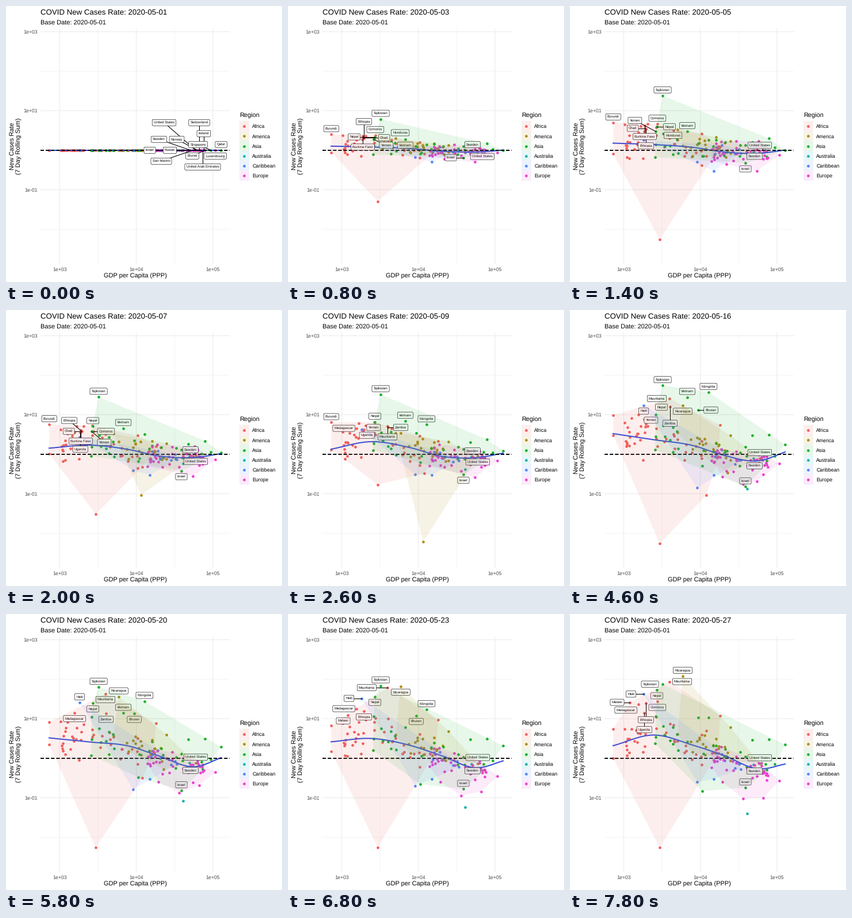
A matplotlib script for the animation above (8000 ms loop, 480 by 480 pixels).

```python
import numpy as np
import matplotlib.pyplot as plt
from matplotlib.animation import FuncAnimation
from matplotlib.patches import Polygon, Rectangle

plt.rcParams["font.family"] = "Liberation Sans"
plt.rcParams["text.hinting"] = "none"

SIZE, FRAMES, STEP = 480, 40, 200
LEFT, RIGHT, TOP, BOTTOM = 60, 389, 39, 448
ONE = 250.8                   # height of the rate 1
DECADE_X, DECADE_Y = 133.2, 68.7
COLORS = {"Africa": "#F35E5A", "America": "#AF8E13", "Asia": "#17B12B",
          "Australia": "#18B0B4", "Caribbean": "#5086FF", "Europe": "#EE3FD3"}

# Trend heights at a few knots, one row per time
KNOTS = np.array([75, 145, 215, 265, 330, 374])
TREND_TIMES = [0, 7, 13, 17, 23, 29, 39]
TREND = np.array([[ONE] * 6,
                  [238.5, 241, 246, 253.5, 256, 250.5],
                  [242, 229, 240, 254, 256.5, 249],
                  [244, 224.5, 237, 255, 259.5, 245],
                  [215, 225.5, 236, 252, 262, 247],
                  [215.5, 222.5, 230, 246.5, 265.5, 250],
                  [229, 210.5, 228.5, 245, 269.5, 261]])

# GDP in thousands, then the rate early, in the middle and at the end
KEYS = [0, 7, 24, 39]
LEADERS = {
    "Africa": {"Burundi": (0.73, 5, 10, 5.5), "Malawi": (1.2, 1.6, 2.8, 26),
               "Madagascar": (1.56, 2.8, 11, 23), "Uganda": (1.86, 3, 8, 14),
               "Burkina Faso": (1.88, 4.2, 3.5, 2), "Chad": (1.92, 3.6, 5, 4),
               "Ethiopia": (1.95, 3.4, 6, 25), "Comoros": (2.75, 4.6, 1.5, 27),
               "Mauritania": (3.96, 2, 30, 87), "Zambia": (4.03, 2.3, 18, 7.5)},
    "America": {"Nicaragua": (5.89, 1.3, 20, 120), "Honduras": (5.05, 3.3, 3.6, 4),
                "United States": (59.7, 0.95, 0.78, 0.73)},
    "Asia": {"Tajikistan": (3.22, 24, 58, 75), "Nepal": (2.71, 3.9, 17, 53),
             "Yemen": (2.61, 3, 11, 11.5), "Vietnam": (6.76, 3, 32, 2.6),
             "Bhutan": (9.4, 1.5, 15, 10.7), "Mongolia": (12.8, 1.8, 45, 10.7),
             "Israel": (38.8, 0.47, 0.14, 0.18), "Brunei": (78.8, 2, 3.2, 3),
             "Qatar": (128, 1, 1.8, 2.2)},
    "Caribbean": {"Haiti": (1.82, 1.8, 20, 42)},
    "Europe": {"Luxembourg": (107.5, 0.76, 0.58, 0.27),
               "San Marino": (54.8, 0.3, 0.2, 0.35),
               "Switzerland": (66.3, 0.6, 0.3, 0.1),
               "Sweden": (51, 0.98, 0.7, 0.66)}}
# Rich countries that move with the crowd
WEALTHY = {"Singapore": ("Asia", 93.7), "Ireland": ("Europe", 76),
           "United Arab Emirates": ("Asia", 73.5), "Kuwait": ("Asia", 71),
           "Norway": ("Europe", 62.9)}
# Nameless outliers that shape the hulls
EDGES = {"Africa": [(0.73, 0.8, 3.3, 1), (12, 0.7, 0.08, 5), (18.1, 1.2, 6, 12)],
         "America": [(24.9, 1.7, 3.1, 6), (22.7, 1, 0.32, 1.4)],
         "Asia": [(10.6, 0.7, 0.5, 0.147), (48, 1.6, 3.1, 2.9)],
         "Australia": [(49.4, 0.93, 0.79, 0.69), (40.8, 0.8, 0.12, 0.04)],
         "Caribbean": [(9.1, 0.5, 0.13, 0.25), (15, 0.3, 0.3, 0.3)],
         "Europe": [(36.3, 0.6, 0.16, 0.095), (19.5, 0.8, 0.25, 0.25)]}
# Crowd: count, left, right, spread, drift
CROWD = {"Africa": (34, 95, 282, 17, 4), "America": (16, 208, 280, 11, -4),
         "Asia": (19, 133, 312, 13, 0), "Caribbean": (7, 232, 306, 9, 8),
         "Europe": (30, 246, 348, 11, 9)}
ALWAYS = ("Sweden", "United States", "Israel")
rng = np.random.default_rng(20)


def x_of(gdp):
    return 226.6 + DECADE_X * np.log10(gdp / 10)


def trend(x, k):
    ys = np.array([np.interp(k, TREND_TIMES, col) for col in TREND.T])
    slope = np.gradient(ys, KNOTS)
    i = np.clip(np.searchsorted(KNOTS, x, side="right") - 1, 0, len(KNOTS) - 2)
    h = KNOTS[i + 1] - KNOTS[i]
    t = (x - KNOTS[i]) / h
    return ((1 + 2 * t) * (1 - t) ** 2 * ys[i] + t * (1 - t) ** 2 * h * slope[i]
            + t * t * (3 - 2 * t) * ys[i + 1] + t * t * (t - 1) * h * slope[i + 1])


def path(rates, times=KEYS):
    ys = ONE - DECADE_Y * np.log10([1, *rates])
    return lambda k: np.interp(k, times, ys)


def drifter(x, spread, drift):
    base, phase = np.clip(rng.normal(), -1.7, 1.7), rng.uniform()

    def height(k):
        sway = base + 0.4 * np.sin(2 * np.pi * (k / 26 + phase))
        return trend(x, k) + min(k / 7, 1) * spread * sway + drift * k / FRAMES
    return height


# Every point: region, name, x, height over time
points = []
for region, rows in LEADERS.items():
    for name, (gdp, *rates) in rows.items():
        points.append((region, name, x_of(gdp), path(rates)))
for region, rows in EDGES.items():
    for gdp, *rates in rows:
        points.append((region, "", x_of(gdp), path(rates)))
for name, (region, gdp) in WEALTHY.items():
    points.append((region, name, x_of(gdp), drifter(x_of(gdp), 9, 0)))
for region, (count, lo, hi, spread, drift) in CROWD.items():
    skew = 1.6 if region == "Africa" else 1
    for u in rng.uniform(size=count):
        x = lo + (hi - lo) * u ** skew
        points.append((region, "", x, drifter(x, spread, drift)))
# Two countries fall to no new cases for a while
points.append(("Africa", "", x_of(2.95),
               path([0.0055, 0.17, 0.17, 0.0055], [0, 7, 13, 17, 23])))
points.append(("America", "", x_of(11.6), path([1.4, 0.0061, 1.2], [0, 7, 13, 17])))


def hull(pts):
    def half(seq):
        out = []
        for p in seq:
            while len(out) > 1 and ((out[-1][0] - out[-2][0]) * (p[1] - out[-2][1])
                                    <= (out[-1][1] - out[-2][1]) * (p[0] - out[-2][0])):
                out.pop()
            out.append(p)
        return out[:-1]
    pts = sorted(pts)
    return half(pts) + half(pts[::-1])


def half_width(name):
    return 1.55 * len(name) + 4


def spread_labels(spots):
    """Give each label the nearest free place around its point."""
    placed = {}
    for name, (x, y) in spots.items():
        w = half_width(name)

        def cost(c):
            hits = sum(abs(c[0] - px) < w + half_width(n) + 1 and abs(c[1] - py) < 13
                       for n, (px, py) in placed.items())
            covers = sum(abs(c[0] - px) < w + 2 and abs(c[1] - py) < 8
                         for px, py in spots.values())
            return 200 * hits + 15 * covers + 0.6 * abs(c[0] - x) + abs(c[1] - y)

        options = [(x + dx, y + dy) for dy in (-10, 10, -19, 19, -29, 29, -48, 0)
                   for dx in (-8, 8, 0, -22, 22, -36, 36, -55)
                   if LEFT + w < x + dx < RIGHT - w]
        placed[name] = min(options, key=cost)
    return placed


fig = plt.figure(figsize=(SIZE / 72, SIZE / 72), dpi=72, facecolor="white")
ax = fig.add_axes([0, 0, 1, 1])
ax.set_xlim(0, SIZE)
ax.set_ylim(SIZE, 0)
ax.axis("off")


def text(x, y, s, size, color="black", ha="left", **kw):
    return ax.text(x, y, s, fontsize=size, color=color, ha=ha, **kw)


def line(xs, ys, color, width, z, **kw):
    return ax.plot(xs, ys, color=color, lw=width, zorder=z, **kw)[0]


for i in range(6):
    width = 0.55 if i % 2 else 1.07
    x, y = 93.4 + i * DECADE_X / 2, 44.7 + i * DECADE_Y
    if i < 5:
        line([x, x], [TOP, BOTTOM], "#EBEBEB", width, 0, snap=False)
    line([LEFT, RIGHT], [y, y], "#EBEBEB", width, 0, snap=False)
    if i % 2 == 0:
        text(x, 460.5, f"1e+0{3 + i // 2}", 8.8, "#4D4D4D", "center")
        text(55, y + 3.2, f"1e{3 - i:+03d}", 8.8, "#4D4D4D", "right")
text(224.5, 473, "GDP per Capita (PPP)", 11, ha="center")
for x, s in ((14, "New Cases Rate"), (25.5, "(7 Day Rolling Sum)")):
    text(x, 243.5, s, 11, ha="center", rotation=90, rotation_mode="anchor")
title = text(60, 15, "", 13.2)
text(60, 32, "Base Date: 2020-05-01", 11)
text(406, 194, "Region", 11)

areas, dots = {}, {}
for i, (region, color) in enumerate(COLORS.items()):
    y = 209 + 17.28 * i
    ax.add_patch(Rectangle((405.6, y - 8.64), 17.28, 17.28, fc=color, alpha=0.1, lw=0))
    ax.scatter([414.2], [y], s=22, color=color, lw=0)
    text(428.3, y + 3.2, region, 8.8)
    areas[region] = ax.add_patch(Polygon([(0, 0)] * 3, fc=color, alpha=0.1, lw=0, zorder=8))
    dots[region] = ax.scatter([], [], s=22, color=color, lw=0, zorder=3)
curve = line([], [], "#3350E0", 2.1, 4)
line([LEFT, RIGHT], [ONE, ONE], "black", 1.9, 5, dashes=(3.2, 1.6), dash_capstyle="butt")
tags = []


def add_tag(name, spot, point):
    dx = max(abs(point[0] - spot[0]) - half_width(name), 0)
    dy = max(abs(point[1] - spot[1]) - 6, 0)
    if np.hypot(dx, dy) > 4.8:
        tags.append(line(*zip(spot, point), "black", 1.1, 6))
    tags.append(text(*spot, name, 6, ha="center", va="center", zorder=7,
                     bbox=dict(boxstyle="round,pad=0.45,rounding_size=0.3",
                               fc="white", ec="black", lw=0.6)))


def draw(k):
    title.set_text(f"COVID New Cases Rate: 2020-05-{1 + 2 * k // 3:02d}")
    now = {region: [] for region in COLORS}
    named = {}
    for region, name, x, height in points:
        spot = (x, float(height(k)))
        now[region].append(spot)
        if name:
            named[name] = spot
    for region, spots in now.items():
        dots[region].set_offsets(spots)
        areas[region].set_xy(hull(spots))
    xs = np.linspace(KNOTS[0], KNOTS[-1], 120)
    curve.set_data(xs, trend(xs, k))

    # Ten highest rates, richest first when tied, and three fixed countries
    rivals = [name for name in named if name not in ALWAYS]
    rivals.sort(key=lambda n: (round(named[n][1], 3), -named[n][0]))
    shown = {name: named[name] for name in [*rivals[:10], *ALWAYS]}
    while tags:
        tags.pop().remove()
    for name, spot in spread_labels(shown).items():
        add_tag(name, spot, shown[name])
    return []


anim = FuncAnimation(fig, draw, frames=FRAMES, interval=STEP, init_func=lambda: [],
                     repeat=True, repeat_delay=0, blit=False)
plt.show()
```
